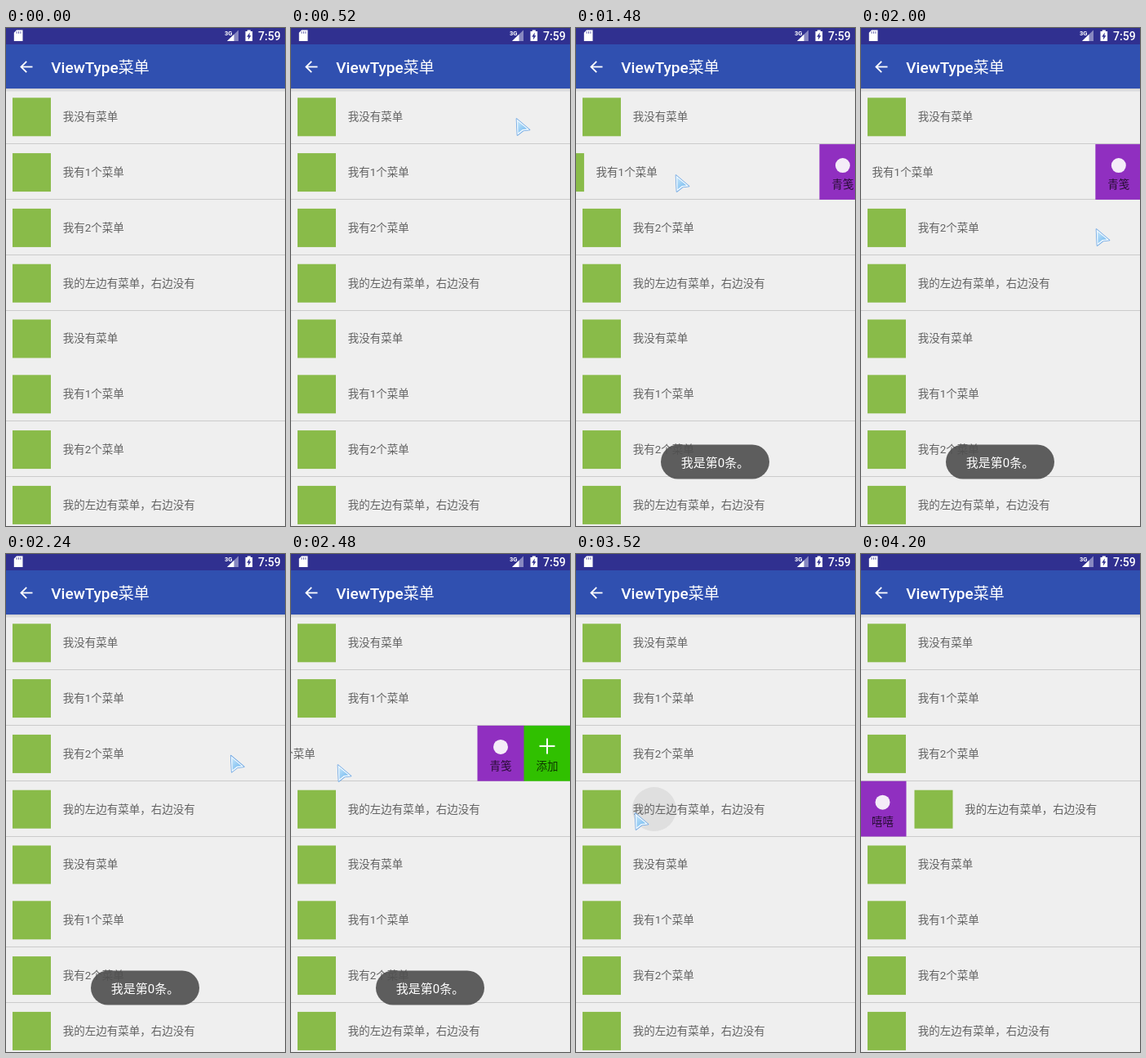
An HTML page with a canvas for the animation above (4.72 s loop, 342 px wide and 609 px high).

```html
<!DOCTYPE html>
<html lang="zh-CN">
<head>
<meta charset="utf-8">
<title>ViewType菜单</title>
<style>
  html, body { margin: 0; width: 100%; height: 100%; overflow: hidden; background: #efefef; }
  canvas { display: block; width: 342px; height: 609px; }
</style>
</head>
<body>
<canvas id="stage"></canvas>
<script>
const W = 342, H = 609, LOOP = 4720, STEP = 40;
const TOP = 74.3, ROW = 67.8, ITEM = 57;
const FONT = 'Roboto, "Noto Sans CJK SC", "Noto Sans CJK", sans-serif';
const LABELS = ['我没有菜单', '我有1个菜单', '我有2个菜单', '我的左边有菜单，右边没有'];

const chat = text => ({ text, colour: '#902fc0' });
const add = { text: '添加', colour: '#30c000', plus: true };

// side -1 slides the row left, 1 slides it right
const SWIPES = {
  1: { side: -1, open: 1340, shut: 1980, items: [chat('青笺')] },
  2: { side: -1, open: 2260, shut: 2860, items: [chat('青笺'), add] },
  3: { side: 1, open: 3950, shut: LOOP, items: [chat('嘻嘻')] }
};
const TAPS = [{ row: 0, time: 720, x: 60 }, { row: 3, time: 3400, x: 72 }];

// The pointer rests between moves
const ENTRY = { x: 338, y: 219 };
const MOVES = [
  { from: 40, to: 520, x: 276, y: 110 },
  { from: 600, to: 720, x: 60, y: 100 },
  { from: 780, to: 960, x: 330, y: 188 },
  { from: 1200, to: 1480, x: 122, y: 179 },
  { from: 1700, to: 2000, x: 288, y: 245 },
  { from: 2200, to: 2480, x: 57, y: 257 },
  { from: 2900, to: 3520, x: 72, y: 316 },
  { from: 3840, to: 4160, x: 311, y: 316 }
];

const canvas = document.getElementById('stage');
const g = canvas.getContext('2d');
const dpr = window.devicePixelRatio || 1;
canvas.width = W * dpr;
canvas.height = H * dpr;

// Smooth rise from 0 to 1 between two times
function ramp(t, from, to) {
  const p = Math.min(1, Math.max(0, (t - from) / (to - from)));
  return p * p * (3 - 2 * p);
}

function rect(x, y, w, h, fill) {
  g.fillStyle = fill;
  g.fillRect(x, y, w, h);
}

function path(points, closed) {
  g.beginPath();
  points.forEach(([x, y]) => g.lineTo(x, y));
  if (closed) g.closePath();
}

function fillPath(points, fill) {
  path(points, true);
  g.fillStyle = fill;
  g.fill();
}

function line(points, stroke, width) {
  path(points);
  g.strokeStyle = stroke;
  g.lineWidth = width;
  g.stroke();
}

function circle(x, y, r, fill) {
  g.beginPath();
  g.arc(x, y, r, 0, Math.PI * 2);
  g.fillStyle = fill;
  g.fill();
}

function text(str, x, y, size, fill, weight = 400, align = 'left') {
  g.font = `${weight} ${size}px ${FONT}`;
  g.textAlign = align;
  g.textBaseline = 'alphabetic';
  g.fillStyle = fill;
  g.fillText(str, x, y + size * 0.37);
  return g.measureText(str).width;
}

function drawItem(item, x, y) {
  const cx = x + ITEM / 2;
  rect(x, y, ITEM + 0.5, ROW, item.colour);
  if (item.plus) {
    line([[cx - 9.5, y + 25], [cx + 9.5, y + 25]], '#fff', 2);
    line([[cx, y + 15.5], [cx, y + 34.5]], '#fff', 2);
  } else {
    circle(cx, y + 26, 9, '#f4ecf8');
  }
  text(item.text, cx, y + 49, 13.5, 'rgba(0,0,0,.72)', 400, 'center');
}

// The ripple speeds up while drifting towards the middle of the row
function drawRipple(tap, t) {
  const age = (t - tap.time) / 120;
  const alpha = 1 - ramp(age, 2.1, 2.7);
  if (age <= 0 || !alpha) return;
  const y = TOP + ROW * tap.row;
  const x = tap.x + (W / 2 - tap.x) * 0.24 * age ** 0.6;
  g.save();
  g.beginPath();
  g.rect(0, y, W, ROW);
  g.clip();
  g.globalAlpha = alpha;
  circle(x, y + ROW / 2 + 0.5 - 3 * (age - 1), 27 * age ** (5 / 3), '#dfdfdf');
  g.restore();
}

function drawRow(i, t) {
  const y = TOP + ROW * i;
  const swipe = SWIPES[i];
  let shift = 0;
  if (swipe) {
    const open = ramp(t, swipe.open, swipe.open + 200) - ramp(t, swipe.shut, swipe.shut + 220);
    shift = swipe.side * swipe.items.length * 57.5 * open;
  }
  TAPS.filter(tap => tap.row === i).forEach(tap => drawRipple(tap, t));
  rect(8 + shift, y + 11, 47, 47, '#89bb49');
  text(LABELS[i % 4], 69.7 + shift, y + 34, 13.5, '#636363');
  if (i !== 4) rect(0, Math.floor(y + ROW - 0.3), W, 1, '#cbcbcb');
  if (shift) {
    const x = shift < 0 ? W + shift + 1.5 : shift - 2.5 - ITEM;
    swipe.items.forEach((item, k) => drawItem(item, x + k * ITEM, y));
  }
}

function drawBars() {
  const shade = g.createLinearGradient(0, 74, 0, 78);
  shade.addColorStop(0, '#d0d0d2');
  shade.addColorStop(1, '#e8e8e8');
  rect(0, 74, W, 4, shade);
  rect(0, 20, W, 54, '#3050b0');
  rect(0, 0, W, 20, '#303090');

  // memory card
  fillPath([[13, 2.5], [20.5, 2.5], [20.5, 16], [9.8, 16], [9.8, 5.7]], '#fff');
  for (let k = 0; k < 3; k++) rect(12.6 + k * 2.4, 4.2, 1, 2.6, '#6a6ab0');

  // signal, battery, clock
  fillPath([[271, 16], [285, 16], [285, 2.5]], '#8888c0');
  fillPath([[271, 16], [279.5, 16], [279.5, 7.8]], '#fff');
  text('3G', 268, 5.8, 7.5, '#fff', 700);
  rect(295.8, 2.5, 4, 2, '#fff');
  rect(293.5, 4, 8.6, 12, '#fff');
  fillPath([[298.8, 5.5], [295.2, 10.8], [297.3, 10.8], [296.8, 14.5], [300.4, 9.3], [298.4, 9.3]], '#303090');
  text('7:59', 309, 9.8, 14, '#fff', 500);

  // back arrow and title
  line([[18.5, 47.5], [32.5, 47.5]], '#fff', 1.8);
  line([[25.2, 40.8], [18.5, 47.5], [25.2, 54.2]], '#fff', 1.8);
  const w = text('ViewType', 55.3, 48.3, 19, '#fff', 500);
  text('菜单', 55.3 + w, 48.3, 19, '#fff');
}

function drawToast(t) {
  const alpha = ramp(t, 950, 1140) - ramp(t, 2760, 3000);
  if (!alpha) return;
  g.save();
  g.globalAlpha = alpha;
  g.beginPath();
  g.roundRect(104, 509.5, 133, 42, 21);
  g.fillStyle = 'rgba(80,80,80,.91)';
  g.fill();
  text('我是第0条。', 128.8, 531, 15, '#fff');
  g.restore();
}

function drawPointer(t) {
  if (t < MOVES[0].from || t > MOVES[MOVES.length - 1].to) return;
  let { x, y } = ENTRY;
  for (const move of MOVES) {
    const p = ramp(t, move.from, move.to);
    x += (move.x - x) * p;
    y += (move.y - y) * p;
  }
  g.save();
  g.translate(x, y + 0.5);
  g.lineJoin = 'round';
  const arrow = [[0.5, 0.5], [16.5, 14], [8.5, 15], [1.5, 20.5]];
  path(arrow, true);
  g.strokeStyle = '#6aa4e2';
  g.lineWidth = 1.6;
  g.stroke();
  fillPath(arrow, '#f0f9ff');
  const blue = g.createLinearGradient(2, 4, 12, 14);
  blue.addColorStop(0, '#c2e4fa');
  blue.addColorStop(1, '#7fbff0');
  fillPath([[2, 3.4], [13.4, 13], [7.9, 13.5], [2.6, 17.8]], blue);
  g.restore();
}

function draw(t) {
  g.setTransform(dpr, 0, 0, dpr, 0, 0);
  rect(0, 0, W, H, '#efefef');
  for (let i = 0; i < 8; i++) drawRow(i, t);
  drawBars();
  drawToast(t);
  drawPointer(t);
}

const start = performance.now();
function tick() {
  const t = (performance.now() - start) % LOOP;
  draw(Math.floor(t / STEP) * STEP);
  requestAnimationFrame(tick);
}
tick();
</script>
</body>
</html>
```
